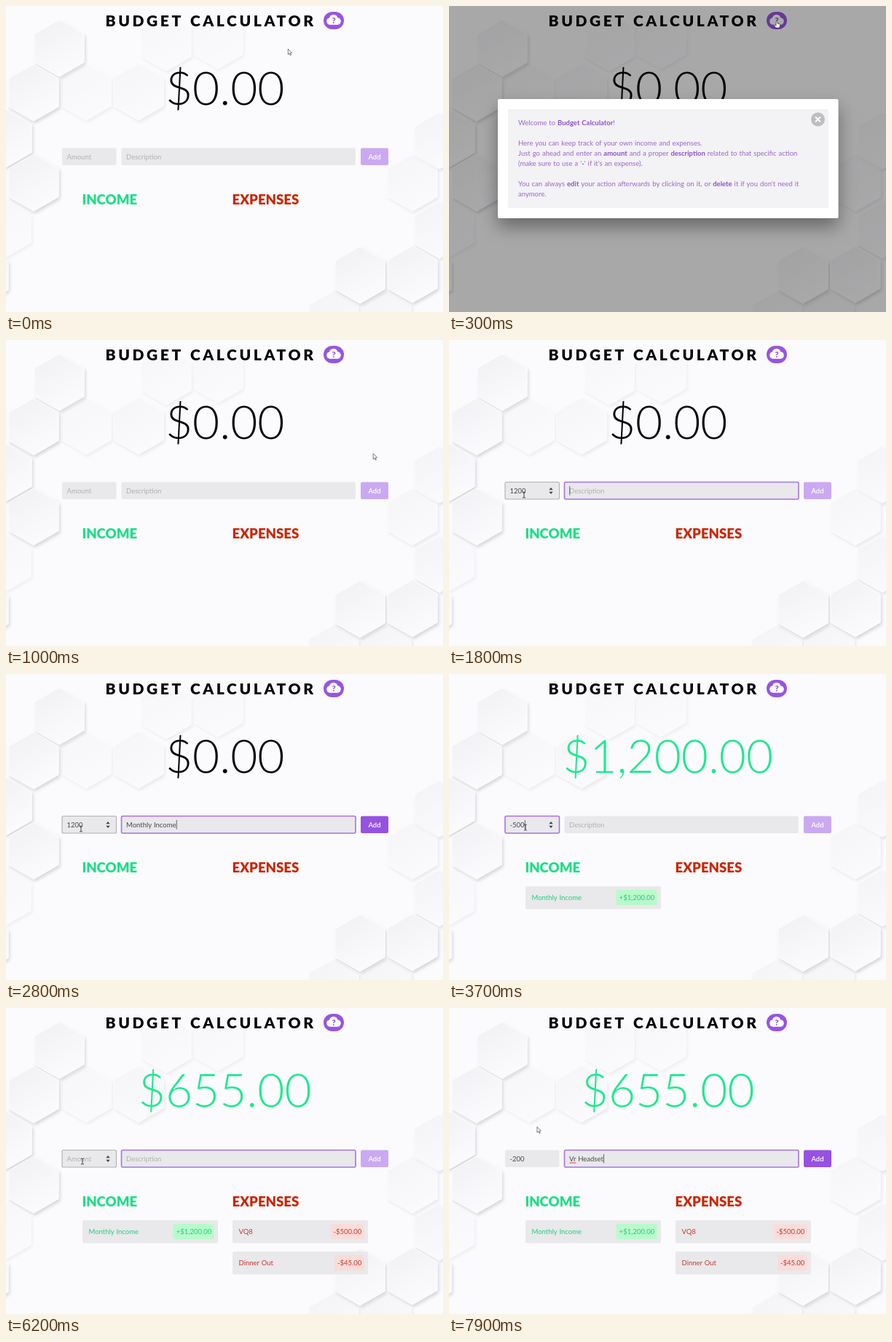
An HTML page that plays this animation: 600x421 px, repeating every 8000 ms.

```html
<!DOCTYPE html>
<html lang="en">
<head>
<meta charset="utf-8">
<title>Budget Calculator</title>
<style>
  html, body { margin: 0; height: 100%; overflow: hidden; background: #fbfafc; }
  svg { display: block; width: 600px; height: 421px; }
  text { font-family: Lato, "Open Sans", sans-serif; font-size: 9.5px; word-spacing: .06em; white-space: pre; }
  .title { font-size: 21px; font-weight: 900; letter-spacing: 3.6px; }
  .head { font-size: 18.6px; font-weight: 900; word-spacing: 0; }
  #balance { font-size: 64px; font-weight: 300; text-anchor: middle; }
  .field { fill: #e9e8ea; }
  .hole { fill: #9655e0; font-size: 11px; font-weight: 900; text-anchor: middle; }
  #modal text { fill: #9b66c9; }
  #modal .strong { font-weight: 700; fill: #8e50c4; }
  .income { fill: #1fcf7c; }
  .expense { fill: #c43a2c; }
  .end { text-anchor: end; }
</style>
</head>
<body>
<svg viewBox="0 0 600 421">
  <defs>
    <linearGradient id="sheen" x1=".1" y1="0" x2=".6" y2="1">
      <stop offset="0" stop-color="#f1f0f2"/>
      <stop offset=".5" stop-color="#f6f5f7"/>
      <stop offset="1" stop-color="#fbfafc"/>
    </linearGradient>
    <filter id="soft" x="-20%" y="-20%" width="150%" height="150%">
      <feDropShadow dx="2" dy="3" stdDeviation="2" flood-opacity=".14"/>
    </filter>
    <filter id="deep" x="-10%" y="-20%" width="120%" height="160%">
      <feDropShadow dx="0" dy="12" stdDeviation="12" flood-opacity=".38"/>
    </filter>
    <path id="hex" d="M0-39L34-19.5V19.5L0 39L-34 19.5V-19.5Z" fill="url(#sheen)" stroke="#fdfcfe" filter="url(#soft)"/>
  </defs>
  <rect width="600" height="421" fill="#fbfafc"/>
  <g id="hexes"></g>

  <text class="title" x="136.5" y="27.5">BUDGET CALCULATOR</text>
  <rect x="436" y="8" width="28" height="24" rx="12" fill="#9655e0"/>
  <g fill="#fff">
    <circle cx="445" cy="21" r="4.8"/><circle cx="455" cy="21" r="4.8"/>
    <circle cx="449.7" cy="17.7" r="5.9"/><rect x="445" y="18" width="10" height="7.8"/>
  </g>
  <text class="hole" x="450" y="23.5">?</text>

  <text id="balance" x="300.7" y="136"></text>

  <rect id="amountBox" class="field" x="77" y="195.5" width="74.5" height="23.5" rx="2"/>
  <text id="amount" x="83.5" y="210.5"></text>
  <path id="spinner" d="M137.3 206.2l2.7-3.2l2.7 3.2zM137.3 208.8l2.7 3.2l2.7-3.2z" fill="#444"/>
  <rect id="descBox" class="field" x="158.5" y="195.5" width="321.5" height="23.5" rx="2"/>
  <text id="desc" x="165" y="210.5"></text>
  <path id="squiggle" d="M165.5 213H174.5" stroke="#e0403a"/>
  <rect id="caret" y="201" width=".9" height="12.5" fill="#555"/>
  <rect id="add" x="487" y="195.5" width="38" height="23.5" rx="2"/>
  <text x="506" y="210.5" fill="#fff" text-anchor="middle" font-weight="600">Add</text>

  <text class="head" x="104.4" y="273.3" fill="#1bdf84">INCOME</text>
  <text class="head" x="310.6" y="273.3" fill="#cb2503">EXPENSES</text>
  <g id="items"></g>

  <rect id="shade" width="600" height="421" opacity=".33"/>
  <g id="modal">
    <rect x="67" y="128" width="467.5" height="164" rx="2" fill="#fff" filter="url(#deep)"/>
    <rect x="81" y="142" width="440" height="136" rx="2" fill="#f3f2f5"/>
    <g id="lines"></g>
    <circle cx="506.5" cy="156" r="9.5" fill="#bebdc0"/>
    <path d="M503 152.5l7 7m0-7l-7 7" stroke="#fff" stroke-width="1.8"/>
  </g>

  <g id="pointer">
    <path id="arrow" d="M0 0V7.8L1.8 6.2L3 8.9L4.2 8.3L3 5.7L5.3 5.5Z" fill="#fff" stroke="#444" stroke-width=".7"/>
    <path id="beam" d="M-2-4Q0-4 0-3Q0-4 2-4M0-3V3M-2 4Q0 4 0 3Q0 4 2 4" fill="none" stroke="#333" stroke-width=".9"/>
    <path id="hand" d="M-.9 0Q0-1 .9 0V3L4 3.8Q4.8 4.2 4.5 6L3.7 9H-1.3L-3.6 5.6Q-3.4 4.5-2.2 5L-.9 6Z" fill="#fff" stroke="#333" stroke-width=".7"/>
  </g>
</svg>
<script>
const LOOP = 8000;
const $ = id => document.getElementById(id);
const clamp = v => Math.min(1, Math.max(0, v));
const show = (id, on) => $(id).style.display = on ? '' : 'none';

// Background hexagons: x, y, strength
$('hexes').innerHTML = [
  [220, 50, .4], [291, 47, .35], [110, 118, .4], [182, 118, .5], [0, 306, .35],
  [-31, 371, .9], [73, 58, .9], [38, 119, 1], [1, 182, 1], [38, 243, 1],
  [595, 185, .7], [558, 243, .5], [595, 308, .7], [450, 431, .7], [522, 431, .6],
  [486, 370, 1], [558, 369, 1]
].map(([x, y, o]) => `<use href="#hex" x="${x}" y="${y}" opacity="${o}"/>`).join('');

// Modal copy: *word* is bold
$('lines').innerHTML = [
  [164, 'Welcome to *Budget Calculator*!'],
  [192, 'Here you can keep track of your own income and expenses.'],
  [206, 'Just go ahead and enter an *amount* and a proper *description* related to that specific action'],
  [220, "(make sure to use a '*-*' if it's an expense)."],
  [248, "You can always *edit* your action afterwards by clicking on it, or *delete* it if you don't need it"],
  [262, 'anymore.']
].map(([y, s]) => `<text x="95" y="${y}">` +
  s.replace(/\*(.+?)\*/g, '<tspan class="strong">$1</tspan>') + '</text>').join('');

// Typing: start, field, text, ms per key
const typing = [
  [1300, 'amount', '1200', 100], [1790, 'desc', 'Monthly Income', 62],
  [3150, 'amount', '-500', 130], [3790, 'desc', 'VQ8', 150],
  [4600, 'amount', '-45', 165], [5390, 'desc', 'Dinner Out', 62],
  [6380, 'amount', '-200', 100], [6850, 'desc', 'Vr Headset', 68]
];
// Submitted entries: time, kind, x, y, name, value, badge width, balance
const entries = [
  [2830, 'income', 105, 292, 'Monthly Income', '+$1,200.00', 56, '$1,200.00'],
  [4450, 'expense', 311, 292, 'VQ8', '-$500.00', 46, '$700.00'],
  [6070, 'expense', 311, 335, 'Dinner Out', '-$45.00', 40.5, '$655.00']
];
$('items').innerHTML = entries.map(([, kind, x, y, name, value, w]) =>
  `<g class="${kind}"><rect class="field" x="${x}" y="${y}" width="186" height="31.5" rx="2"/>
  <rect x="${x + 180.5 - w}" y="${y + 5}" width="${w}" height="21" rx="1.5" fill="${kind == 'income' ? '#b8facb' : '#fadcd9'}"/>
  <text x="${x + 8.5}" y="${y + 19}">${name}</text>
  <text class="end" x="${x + 177.3}" y="${y + 19}">${value}</text></g>`).join('');

// Pointer: time, x, y
const path = [
  [0, 387.3, 59], [260, 450, 21], [450, 450, 21], [850, 506, 156], [990, 506, 156],
  [1270, 104, 212], [1800, 103, 213], [2850, 103, 213], [3150, 105, 211],
  [7550, 105, 211], [7900, 121, 163.5], [LOOP, 121, 163.5]
];
function pointerAt(t) {
  const i = path.findIndex(p => p[0] > t);
  const [a, b] = [path[i - 1], path[i]];
  const k = (t - a[0]) / (b[0] - a[0]), e = k * k * (3 - 2 * k);
  return [a[1] + (b[1] - a[1]) * e, a[2] + (b[2] - a[2]) * e];
}

function formAt(t) {
  const form = { amount: '', desc: '', focus: '', caret: false, balance: '$0.00' };
  const steps = [...typing, ...entries].filter(s => s[0] <= t).sort((a, b) => a[0] - b[0]);
  for (const s of steps) {
    if (s.length > 4) {
      Object.assign(form, { amount: '', desc: '', caret: false, balance: s[7] });
    } else {
      form[s[1]] = s[2].slice(0, Math.floor((t - s[0]) / s[3]));
      form.focus = s[1];
      form.caret = true;
    }
  }
  return form;
}

function drawField(id, value, hint, focused, hovered) {
  const text = $(id), box = $(id + 'Box');
  text.textContent = value || hint;
  text.setAttribute('fill', value ? '#49484b' : '#b1b0b4');
  box.setAttribute('stroke', focused ? '#a673e3' : hovered ? '#b0afb3' : 'none');
  box.setAttribute('stroke-width', focused ? 1.6 : 1.1);
}

function draw(t) {
  const form = formAt(t), [x, y] = pointerAt(t);
  const open = t >= 290 && t < 1000;
  const inRow = !open && y > 195 && y < 219;
  const overAmount = inRow && x > 77 && x < 152;
  const overDesc = inRow && x > 158 && x < 480;

  $('balance').textContent = form.balance;
  $('balance').setAttribute('fill', form.balance == '$0.00' ? '#050505' : '#1bea8e');
  drawField('amount', form.amount, 'Amount', form.focus == 'amount', overAmount);
  drawField('desc', form.desc, 'Description', form.focus == 'desc', overDesc);
  show('spinner', overAmount || form.focus == 'amount');
  show('squiggle', /^Vr /.test(form.desc));
  $('add').setAttribute('fill', form.amount && form.desc ? '#9651e1' : '#caa9f1');

  show('caret', form.caret);
  if (form.caret) {
    const text = $(form.focus);
    const width = form[form.focus] ? text.getComputedTextLength() : 0;
    $('caret').setAttribute('x', +text.getAttribute('x') + width + .3);
  }
  entries.forEach((e, i) => $('items').children[i].style.opacity = clamp((t - e[0]) / 130));

  show('shade', open);
  show('modal', open);

  const overClose = open && Math.hypot(x - 506.5, y - 156) < 9.5;
  const overHelp = x > 436 && x < 464 && y > 8 && y < 32;
  const hand = overClose || overHelp, beam = overAmount || overDesc;
  show('hand', hand);
  show('beam', beam);
  show('arrow', !hand && !beam);
  $('pointer').setAttribute('transform', `translate(${x} ${y})`);
}

const start = performance.now();
function tick() {
  draw((performance.now() - start) % LOOP);
  requestAnimationFrame(tick);
}
tick();
</script>
</body>
</html>
```
